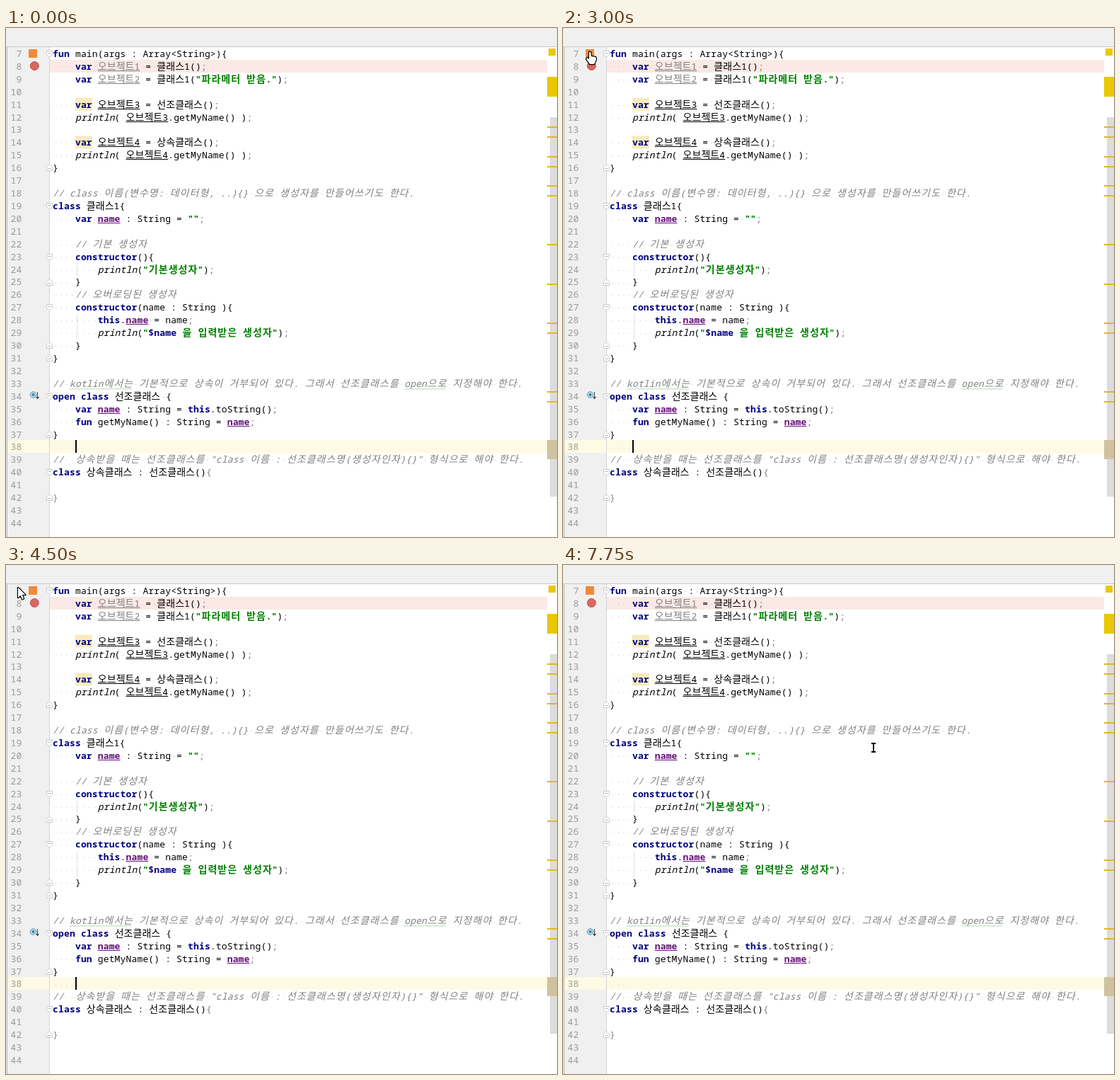
These frames come from a looping animation (779x719 px, 8 s). An HTML page with a canvas:

```html
<!DOCTYPE html>
<html lang="ko">
<head>
<meta charset="utf-8">
<title>Kotlin editor</title>
<style>
html, body { margin: 0; width: 100%; height: 100%; overflow: hidden; background: #fff; }
canvas { display: block; width: 779px; height: 719px; }
</style>
</head>
<body>
<canvas id="stage" width="779" height="719"></canvas>
<script>
const W = 779, H = 719, LOOP = 8000;
const MONO = '13px "Noto Sans Mono", "DejaVu Sans Mono", monospace';
const HANGUL = '14px "Noto Sans CJK KR", "Noto Sans CJK", sans-serif';
const UI = '"DejaVu Sans", "Noto Sans CJK KR", sans-serif';
const PITCH = 7.955, LEFT = 66.1, LINE = 17.92, FIRST = 7, BASE = 4.9;

const STYLES = {
  p: { color: '#000' },
  g: { color: '#808080' },
  k: { color: '#000080', face: 'bold' },
  w: { color: '#000080', face: 'bold', back: '#f6ebbc' },
  s: { color: '#008000', face: 'bold' },
  f: { color: '#660e7a', face: 'bold', under: true },
  u: { color: '#808080', under: true },
  v: { color: '#000', under: true },
  i: { color: '#000', face: 'italic' },
  c: { color: '#808080', face: 'italic' },
  t: { color: '#808080', face: 'italic', wave: true }
};

// Each run is a style letter followed by its text; runs are split by "|".
const CODE = [
  'kfun|p main(args : Array<String>){',
  'p    |kvar|p |u오브젝트1|p = 클래스1()|g;',
  'p    |kvar|p |u오브젝트2|p = 클래스1(|s"파라메터 받음."|p)|g;',
  '',
  'p    |wvar|p |v오브젝트3|p = 선조클래스()|g;',
  'p    |iprintln|p( |v오브젝트3|p.getMyName() )|g;',
  '',
  'p    |wvar|p |v오브젝트4|p = 상속클래스()|g;',
  'p    |iprintln|p( |v오브젝트4|p.getMyName() )|g;',
  'p}',
  '',
  'c// class 이름(변수명: 데이터형, ..){} 으로 생성자를 만들어쓰기도 한다.',
  'kclass|p 클래스1{',
  'p    |kvar|p |fname|p : String = |s""|g;',
  '',
  'p    |c// 기본 생성자',
  'p    |kconstructor|p(){',
  'p        |iprintln|p(|s"기본생성자"|p)|g;',
  'p    }',
  'p    |c// 오버로딩된 생성자',
  'p    |kconstructor|p(name : String ){',
  'p        |kthis|p.|fname|p = name|g;',
  'p        |iprintln|p(|s"|k$name|s 을 입력받은 생성자"|p)|g;',
  'p    }',
  'p}',
  '',
  'c// |tkotlin에서는|c 기본적으로 상속이 거부되어 있다. 그래서 선조클래스를 |topen으로|c 지정해야 한다.',
  'kopen class|p 선조클래스 {',
  'p    |kvar|p |fname|p : String = |kthis|p.toString()|g;',
  'p    |kfun|p getMyName() : String = |fname|g;',
  'p}',
  'p    ',
  'c//  상속받을 때는 선조클래스를 "class 이름 : 선조클래스명(생성자인자){}" 형식으로 해야 한다.',
  'kclass|p 상속클래스 : 선조클래스()|g{',
  '',
  'g}',
  '',
  ''
];

const rowY = n => 36 + LINE * (n - FIRST);
const isHangul = ch => ch >= '\uac00' && ch <= '\ud7a3';
let g;

function box(color, x, y, w, h) {
  g.fillStyle = color;
  g.fillRect(x, y, w, h);
}

function trace(points) {
  g.beginPath();
  points.forEach(([x, y]) => g.lineTo(x, y));
  g.closePath();
}

function poly(points, fill, stroke) {
  trace(points);
  g.fillStyle = fill;
  g.fill();
  if (stroke) { g.strokeStyle = stroke; g.lineWidth = 1; g.stroke(); }
}

function disc(x, y, r, fill, stroke) {
  g.beginPath();
  g.arc(x, y, r, 0, 7);
  g.fillStyle = fill;
  g.fill();
  if (stroke) { g.strokeStyle = stroke; g.lineWidth = 1; g.stroke(); }
}

function text(str, x, y, font, color) {
  g.font = font;
  g.fillStyle = color;
  g.fillText(str, x, y);
}

function wave(x, end, y) {
  g.beginPath();
  for (let i = 0; x + i * 2 <= end; i++) g.lineTo(x + i * 2, y + (i % 2 ? 1 : -1));
  g.strokeStyle = '#9cc59c';
  g.lineWidth = 0.8;
  g.stroke();
}

function drawRun(run, x, mid) {
  const style = STYLES[run[0]], face = style.face || '', str = run.slice(1);
  const wide = face ? 13.92 : 12.93;
  const base = mid + BASE, start = x;
  if (style.back) box(style.back, x, mid - 9, str.length * PITCH, 18);
  for (const ch of str) {
    if (ch === ' ') {
      box('#c9c9c9', Math.round(x + PITCH / 2 - 0.5), Math.round(mid + 1), 1, 1);
      x += PITCH;
    } else if (isHangul(ch)) {
      text(ch, x + (wide - 12.88) / 2, base, `${face} ${HANGUL}`, style.color);
      x += wide;
    } else {
      text(ch, x, base, `${face} ${MONO}`, style.color);
      x += PITCH;
    }
  }
  if (style.under) box(style.color, start, Math.round(base + 1), x - start, 1);
  if (style.wave) wave(start, x, base + 3);
  return x;
}

function fold(line, dir) {
  const y = Math.round(rowY(line)) + 0.5, x = 61;
  const pts = [[-4, -4], [4, -4], [4, 1], [0, 5], [-4, 1]];
  poly(pts.map(([a, b]) => [x + a + 0.5, y + b * dir]), '#fff', '#c9c9c9');
  box('#b5b5b5', x - 1.5, y - 0.5 - dir, 4, 1);
}

function drawStripe() {
  box('#dcdcdc', 769, 126, 10, 536);
  box('#ebc700', 767, 29, 10, 10);
  box('#ebc700', 765, 69, 14, 28);
  for (const y of [139, 153, 181, 195, 222, 236, 305, 361, 416, 430, 513, 527])
    box('#dfba1c', 765, y, 14, 2);
  box('#cfc39f', 765, 582, 14, 27);
}

function drawEditor() {
  box('#fff', 0, 0, W, H);
  box('#f0f0f0', 0, 0, W, 26);
  box('#c9c9c9', 0, 26, W, 1);
  box('#f0f0f0', 0, 27, 61, H);
  box('#fae9e5', 62, 45, 703, 18);
  box('#fffae3', 2, 582, 763, 18);
  box('#d6d6d6', 61, 27, 1, H);
  box('#b4b4b4', 1, 27, 1, H);
  box('#e2e2e2', 100, 332, 1, 18);
  box('#e2e2e2', 100, 404, 1, 36);

  CODE.forEach((line, i) => {
    const n = FIRST + i, mid = rowY(n);
    [...String(n)].reverse().forEach((digit, k) =>
      text(digit, 22.5 - PITCH * (k + 1), mid + BASE, MONO, '#999'));
    let x = LEFT;
    if (line) for (const run of line.split('|')) x = drawRun(run, x, mid);
  });

  [7, 19, 23, 27, 34, 40].forEach(n => fold(n, 1));
  [16, 25, 30, 31, 37, 42].forEach(n => fold(n, -1));

  box('#f18a3a', 32, 30, 12, 12);
  disc(40.3, 53.5, 6, '#db6860', '#b5544d');
  disc(38.5, 518, 4.3, '#a9d6e8', '#5a9db8');
  disc(38.5, 518, 1.8, '#3f6f86');
  box('#444', 44, 514, 1, 10);
  poly([[42, 521], [47, 521], [44.5, 524.5]], '#444');
  drawStripe();
}

function drawTip() {
  poly([[54.5, 72.5], [173, 72.5], [182, 63.5], [191, 72.5], [310.5, 72.5], [310.5, 97.5], [54.5, 97.5]],
    '#fefed2', '#8f8f78');
  text("Variable '오브젝트1' is never used", 59.5, 89.5, `15px ${UI}`, '#000');
}

function menuLabel(str, key, base, color) {
  text(str, 61.5, base, `15px ${UI}`, color);
  const x = 61.5 + g.measureText(str.slice(0, key)).width;
  box(color, x, Math.round(base + 2), g.measureText(str[key]).width, 1);
}

function drawBug(x, y) {
  g.strokeStyle = '#2f7d3b';
  g.lineWidth = 1.2;
  g.beginPath();
  for (const dy of [-4, 0, 4]) {
    g.moveTo(x - 6, y + dy);
    g.lineTo(x + 6, y + dy);
  }
  g.stroke();
  g.beginPath();
  g.ellipse(x, y, 4, 5.3, 0, 0, 7);
  g.fillStyle = '#3f9b4b';
  g.fill();
}

function drawMenu(selected) {
  g.save();
  g.shadowColor = 'rgba(0,0,0,.4)';
  g.shadowBlur = 28;
  g.shadowOffsetX = 3;
  g.shadowOffsetY = 9;
  box('#efefef', 38, 37, 297, 68);
  g.restore();
  box('#3a75d7', 38, 37 + 23 * selected, 297, 23);

  const ink = i => i === selected ? '#fff' : '#111';
  menuLabel("Run 'oop.ClassKt'", 1, 53, ink(0));
  menuLabel("Debug 'oop.ClassKt'", 0, 75.5, ink(1));
  menuLabel("Run 'oop.ClassKt' with Coverage", 25, 98, ink(2));
  text('Ctrl+Shift+F10', 225, 52.5, `13px ${UI}`, selected ? '#444' : '#1c2a44');

  poly([[43.5, 41.5], [54, 48], [43.5, 54.5]], '#3aa54a', '#2c8a3b');
  drawBug(48, 70.5);
  for (let i = 0; i < 20; i++) {
    const col = i % 4, row = i >> 2;
    if ((col + row) % 2 === 0) box('#8a8a8a', 46 + col * 2.5, 87 + row * 2.5, 2.5, 2.5);
  }
  poly([[42, 88], [48, 93], [42, 98]], '#3aa54a');
}

function pointerShape(points, x, y) {
  trace(points.map(([a, b]) => [x + a, y + b]));
  g.lineWidth = 2.4;
  g.lineJoin = 'round';
  g.strokeStyle = '#000';
  g.stroke();
  g.fillStyle = '#fff';
  g.fill();
}

const CURSORS = {
  beam(x, y) {
    for (const [color, e] of [['#fff', 1], ['#000', 0]]) {
      box(color, x - 1 - e, y - 7 - e, 2 + 2 * e, 14 + 2 * e);
      box(color, x - 3 - e, y - 7 - e, 6 + 2 * e, 2 + 2 * e);
      box(color, x - 3 - e, y + 5 - e, 6 + 2 * e, 2 + 2 * e);
    }
  },
  arrow(x, y) {
    pointerShape([[0, 1], [0, 15], [3.5, 12], [6, 17.5], [8, 16.5], [6, 11], [10.5, 11]], x, y);
  },
  hand(x, y) {
    pointerShape([[5, 1], [7, 1], [8, 7], [14, 8], [15, 10], [14, 14], [12, 18], [6, 18], [1, 11], [2, 9], [5, 11]], x, y);
  }
};

// Pointer poses, each held until the next one.
const POINTER = [
  [0],
  [1500, 'beam', 586, 443],
  [1750, 'beam', 222, 109],
  [2000, 'beam', 182, 63],
  [2250, 'beam', 150, 57],
  [2500, 'beam', 94, 52],
  [2750, 'arrow', 51, 37],
  [3000, 'hand', 32, 33],
  [3500, 'arrow', 56, 44],
  [3750, 'arrow', 62, 49],
  [4000, 'arrow', 70, 66],
  [4500, 'arrow', 17, 31],
  [4750, 'beam', 439, 258]
];
const BLINKS = [1500, 2000, 2500, 3000, 3500, 4500, 5750, 6250, 6500, 7250, 7750];

const ctx = document.getElementById('stage').getContext('2d');
const page = document.createElement('canvas');
page.width = W;
page.height = H;
g = page.getContext('2d');
drawEditor();
g = ctx;

function draw(t) {
  g.drawImage(page, 0, 0);
  if (BLINKS.filter(b => b <= t).length % 2 === 0) box('#000', 98, 582, 2, 18);
  if (t >= 2250 && t < 2750) drawTip();
  if (t >= 3500 && t < 4500) drawMenu(t < 4000 ? 0 : 1);
  const [, kind, x, y] = POINTER.filter(p => p[0] <= t).pop();
  if (kind) CURSORS[kind](x, y);
}

const start = performance.now();
function frame() {
  draw((performance.now() - start) % LOOP);
  requestAnimationFrame(frame);
}
frame();
</script>
</body>
</html>
```
